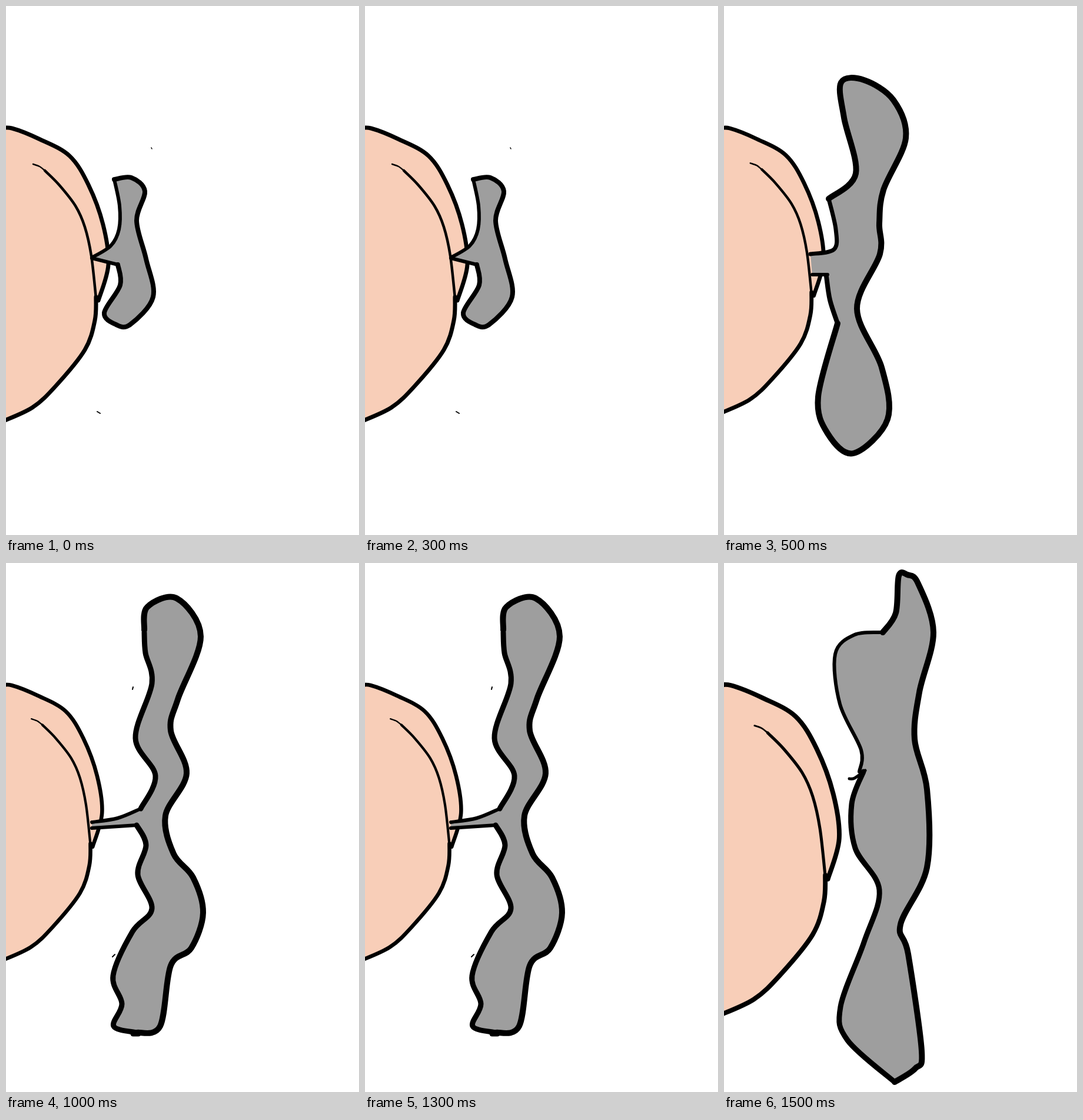
Recreate the animation shown at these times as an HTML page with a canvas. Size 600x900 px, loop 2000 ms.

```html
<!DOCTYPE html>
<html lang="en">
<head>
<meta charset="utf-8">
<style>
  html, body { margin: 0; height: 100%; overflow: hidden; background: #fff; }
  canvas { display: block; }
</style>
</head>
<body>
<canvas id="stage" width="600" height="900"></canvas>
<script>
const ctx = document.getElementById('stage').getContext('2d');
const SKIN = '#f8ceb8', GREY = '#9e9e9e', STEP = 500, TOP = 208;

// A stroke is [line width, key points of a smooth curve].
const back = [7, '-9,209 10,208 58,227 108,255 140,304 165,372 174,440 157,501'];
const front = [7, '153,495 151,535 134,585 85,646 45,683 -9,708'];
const crease = [4.5, '66,280 90,304 118,340 134,376 145,425 153,497'];
const creaseTip = [2.5, '46,269 57,273 66,280'];

// The body only changes size; the splash has a new outline in each pose.
const poses = [
  {
    size: 1,
    outline: [
      [6, '146,428 178,408 192,380 193,340 184,295'],
      [8, '184,295 213,292 236,315 222,365 238,430 250,495 211,542 187,542 167,522 194,475 190,440'],
      [6, '190,440 146,429'],
    ],
    specks: [[1.5, '247,241 248,243'], [2, '155,690 160,693']],
  },
  {
    size: .972,
    outline: [
      [7, '147,422 187,414 190,380 178,328'],
      [10, '178,328 224,285 204,190 199,130 238,126 288,160 309,225 271,313 264,370 265,422 226,515 268,615 278,703 220,761 176,727 160,665 193,540'],
      [8, '193,540 180,500 174,460'],
      [6, '176,457 150,457'],
    ],
  },
  {
    size: .938,
    outline: [
      [6, '146,441 190,434 229,418'],
      [9, '229,418 254,362 220,298 248,205 237,153 235,118'],
      [10, '235,114 240,75 290,60 331,125 292,232 280,285 307,358 271,430 285,495 318,535 335,595 315,655 280,685 262,788 222,799'],
      [9, '222,799 183,788 197,750 182,702 215,627 248,588 224,530 238,480 222,446'],
      [6, '222,446 146,451'],
    ],
    specks: [[9, '216,801 225,801'], [2, '216,211 215,215'], [2, '185,666 181,670']],
  },
  {
    size: 1.125,
    outline: [
      [9, '237,355 217,410 223,485 264,556 238,645 198,755 210,812 290,883'],
      [10, '290,883 325,860 336,830 313,665 300,615 345,518 345,385 324,300 332,220 356,118 330,35 312,20 297,22 292,85 270,118'],
      [6, '270,118 222,122 189,155 197,240 233,318 230,355'],
    ],
    specks: [[5, '213,367 222,366 240,353']],
  },
];

// Appends a smooth curve through the points to path.
function trace(path, text, join) {
  const p = text.split(' ').map(s => s.split(',').map(Number));
  path[join ? 'lineTo' : 'moveTo'](...p[0]);
  for (let i = 0; i < p.length - 1; i++) {
    const a = p[i], b = p[i + 1], before = p[i - 1] || a, after = p[i + 2] || b;
    path.bezierCurveTo(
      a[0] + (b[0] - before[0]) / 6, a[1] + (b[1] - before[1]) / 6,
      b[0] - (after[0] - a[0]) / 6, b[1] - (after[1] - a[1]) / 6, ...b);
  }
}

function fill(strokes, color) {
  const path = new Path2D();
  strokes.forEach(([, text], i) => trace(path, text, i > 0));
  ctx.fillStyle = color;
  ctx.fill(path);
}

function ink(strokes) {
  for (const [width, text] of strokes) {
    const path = new Path2D();
    trace(path, text);
    ctx.lineWidth = width;
    ctx.stroke(path);
  }
}

function drawBody(size) {
  ctx.save();
  ctx.translate(0, TOP);
  ctx.scale(size, size);
  ctx.translate(0, -TOP);
  fill([back, front], SKIN);
  ink([back, front, crease, creaseTip]);
  ctx.restore();
}

function draw({ size, outline, specks = [] }) {
  ctx.fillStyle = '#fff';
  ctx.fillRect(0, 0, 600, 900);
  ctx.lineCap = ctx.lineJoin = 'round';
  drawBody(size);
  fill(outline, GREY);
  ink([...outline, ...specks]);
}

function tick() {
  draw(poses[Math.floor(performance.now() / STEP) % poses.length]);
  requestAnimationFrame(tick);
}
tick();
</script>
</body>
</html>
```
